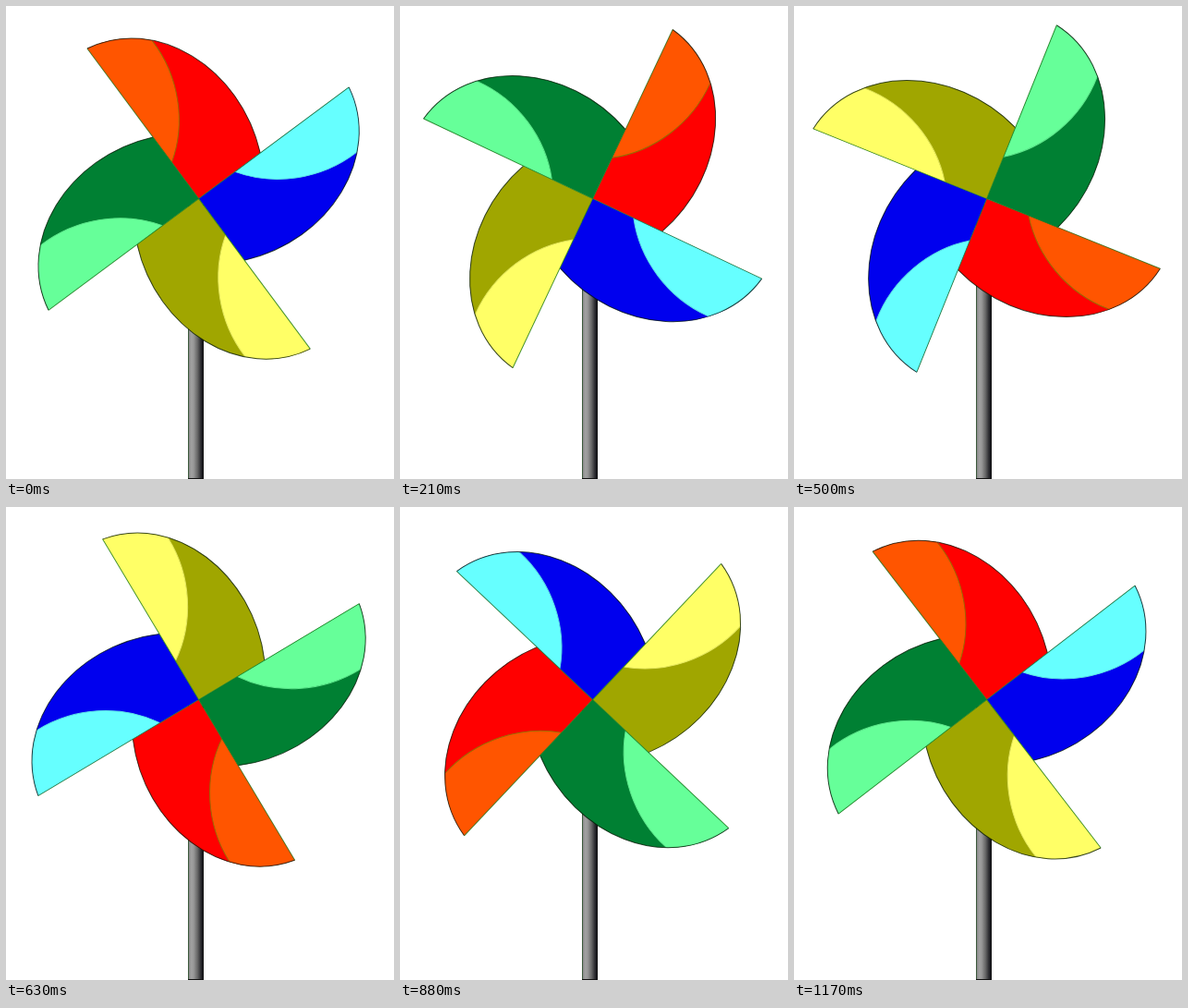
An HTML page with a canvas for the animation above (1210 ms loop, 420 by 512 pixels).

```html
<!DOCTYPE html>
<html lang="en">
<head>
<meta charset="utf-8">
<title>Pinwheel</title>
<style>
  html, body { margin: 0; width: 100%; height: 100%; overflow: hidden; background: #fff; }
  canvas { display: block; }
</style>
</head>
<body>
<canvas id="stage" width="420" height="512"></canvas>
<script>
const ctx = document.getElementById("stage").getContext("2d");

const LOOP = 1210;
const HUB = { x: 208.6, y: 208.6 };
const START_ANGLE = -36.6;
const STEP_ANGLE = 359 / 29;

// Clockwise from the first blade; "fold" is the lighter turned-over part.
const BLADES = [
  { body: "#ff0000", fold: "#ff5500", seam: "#9a6a00" },
  { body: "#0000ee", fold: "#66ffff", seam: "#5ce0e6" },
  { body: "#a0a600", fold: "#ffff66", seam: "#e4e65c" },
  { body: "#008033", fold: "#66ff99", seam: "#5ce68a" }
];

// Blade geometry with its straight edge pointing up from the hub.
const outline = new Path2D("M0 0 L0 -202.5 C81 -187.5 121.5 -87 83 0 Z");
const rim = new Path2D("M0 -202.5 C81 -187.5 121.5 -87 83 0");
const seam = new Path2D("M0 -49 C37.5 -73.5 62.5 -119 61.5 -167");
const fold = new Path2D("M0 -49 C37.5 -73.5 62.5 -119 61.5 -167 L110 -215 L0 -215 Z");
const edge = new Path2D("M0 0 L0 -202.5");

const poleShade = ctx.createLinearGradient(197, 0, 214, 0);
[[0, "#808080"], [0.2, "#a0a0a0"], [0.35, "#999999"], [0.6, "#686868"], [0.85, "#25252a"], [1, "#111116"]]
  .forEach(([at, color]) => poleShade.addColorStop(at, color));

function stroke(path, color) {
  ctx.strokeStyle = color;
  ctx.stroke(path);
}

function drawPole() {
  ctx.fillStyle = poleShade;
  ctx.fillRect(197, 215, 17, 297);
  ctx.fillStyle = "#3c5a3c";
  ctx.fillRect(197, 215, 1, 297);
  ctx.fillStyle = "#111";
  ctx.fillRect(213, 215, 1, 297);
  ctx.fillRect(197, 511, 17, 1);
}

function drawBlade({ body, fold: foldColor, seam: seamColor }) {
  ctx.fillStyle = body;
  ctx.fill(outline);
  ctx.save();
  ctx.clip(outline);
  ctx.fillStyle = foldColor;
  ctx.fill(fold);
  stroke(seam, seamColor);
  ctx.restore();
  stroke(rim, "rgba(0, 20, 0, 0.75)");
}

function eachBlade(angle, draw) {
  BLADES.forEach((blade, i) => {
    ctx.save();
    ctx.translate(HUB.x, HUB.y);
    ctx.rotate((angle + i * 90) * Math.PI / 180);
    draw(blade);
    ctx.restore();
  });
}

// 24 pictures a second on a 10 ms clock, taken from a 25-per-second turn.
function angleAt(time) {
  const tick = Math.floor((time % LOOP) / 10) * 10;
  const picture = Math.floor((tick + 4) * 24 / 1000);
  return START_ANGLE + STEP_ANGLE * Math.floor(picture * 25 / 24);
}

function render(time) {
  const angle = angleAt(time);
  ctx.fillStyle = "#fff";
  ctx.fillRect(0, 0, 420, 512);
  ctx.lineWidth = 1;
  drawPole();
  eachBlade(angle, drawBlade);
  eachBlade(angle, () => stroke(edge, "rgba(25, 125, 25, 0.75)"));
}

function loop(time) {
  render(time);
  requestAnimationFrame(loop);
}

render(0);
requestAnimationFrame(loop);
</script>
</body>
</html>
```
